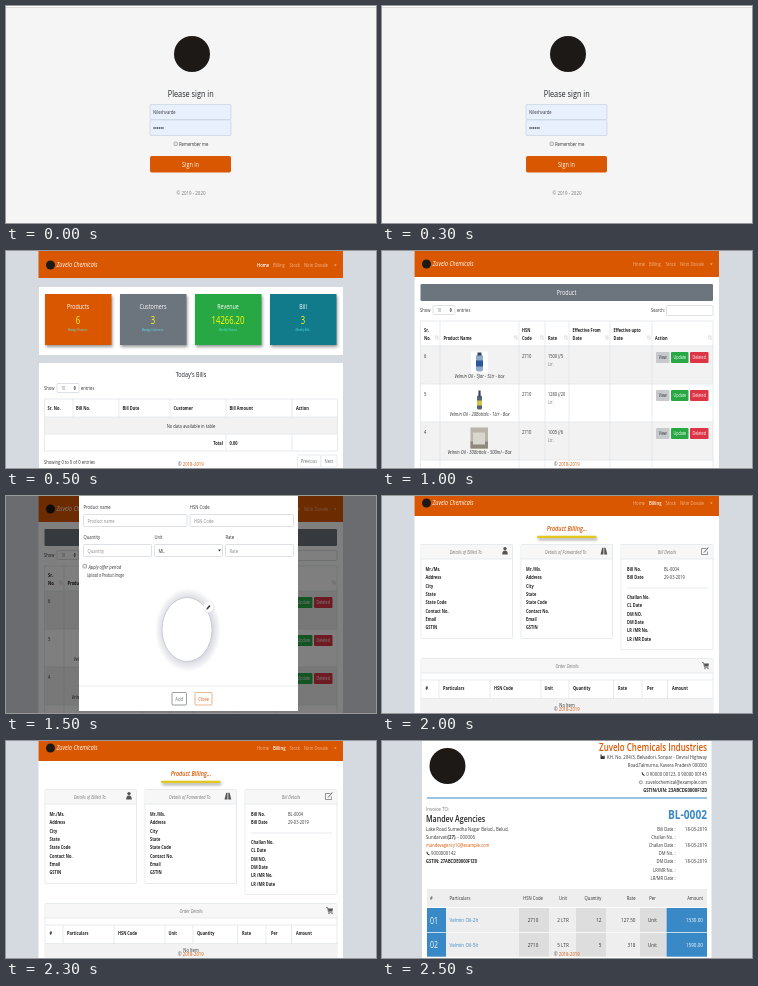
Write an HTML page that moves like this. It is 370 px wide and 217 px high and loops after 3000 ms.

```html
<!DOCTYPE html>
<html lang="en">
<head>
<meta charset="utf-8">
<title>Billing app tour</title>
<style>
  html, body { margin: 0; width: 100%; height: 100%; overflow: hidden; background: #d5dae1; }
  svg { display: block; width: 370px; height: 217px; }
  text { font-family: "Open Sans", "Noto Sans", sans-serif; white-space: pre; }
  .m { text-anchor: middle; }
  .e { text-anchor: end; }
  .b { font-weight: 700; }
  .h { font-weight: 600; }
  .i { font-style: italic; }
  .card { filter: drop-shadow(1.5px 2px 1.5px rgba(0, 0, 0, .4)); }
  .scene { visibility: hidden; animation: one 3s step-end infinite; }
  .scene.long { animation-name: two; }
  @keyframes one { 0% { visibility: visible; } 16.6667%, 100% { visibility: hidden; } }
  @keyframes two { 0% { visibility: visible; } 33.3333%, 100% { visibility: hidden; } }
</style>
</head>
<body>
<svg id="stage" viewBox="0 0 370 217" xmlns="http://www.w3.org/2000/svg"></svg>
<script>
const ORANGE = '#d95700', GREY = '#6c757d', GREEN = '#28a745', BLUE = '#3989c6';
const INK = '#333', DIM = '#777', LINE = '#dee2e6', PAGE = '#d5dae1', DARK = '#1d1917';
const SQUEEZE = .77; // the screens are shown narrower than their natural width

const each = (list, fn) => list.map(fn).join('');
const text = (x, y, str, size = 5.4, fill = INK, cls = '') =>
  `<text transform="translate(${x} ${y}) scale(${SQUEEZE} 1)" font-size="${size}" fill="${fill}" class="${cls}">${str}</text>`;
const box = (x, y, x2, y2, fill, extra = '') =>
  `<rect x="${x}" y="${y}" width="${x2 - x}" height="${y2 - y}" fill="${fill}" ${extra}/>`;
const frame = (x, y, x2, y2, stroke = LINE, fill = '#fff', r = 1) =>
  box(x + .5, y + .5, x2 - .5, y2 - .5, fill, `stroke="${stroke}" stroke-width=".7" rx="${r}"`);
const path = (d, stroke = LINE, width = .7, fill = 'none') =>
  `<path d="${d}" stroke="${stroke}" stroke-width="${width}" fill="${fill}"/>`;
const solid = (d, fill) => path(d, 'none', 0, fill);
const dot = (x, y, r, fill = DARK) => `<circle cx="${x}" cy="${y}" r="${r}" fill="${fill}"/>`;
const phone = (x, y) => path(`M${x} ${y}q.2 2.5 2.6 3.2`, INK, 1.1);
const vlines = (xs, y, y2) => path(each(xs, x => `M${x} ${y}V${y2}`));
const hlines = (ys, x, x2) => path(each(ys, y => `M${x} ${y}H${x2}`));
const scene = (slot, body, long = '') =>
  `<g class="scene ${long}" style="animation-delay:${slot * 500 - 3000}ms">${body}</g>`;

const backdrop = box(0, 0, 370, 217, PAGE);
const copyright = text(172, 215, `© <tspan fill="${ORANGE}">2018-2019</tspan>`, 5.6);

function nav(bottom, active) {
  const y = bottom - 11;
  const links = [['Home', 251], ['Billing', 267], ['Stock', 283.5], ['Nitin Dovale', 298]];
  return box(32.5, 0, 337, bottom, ORANGE) + dot(44.5, y - 2, 4.5) +
    text(50.5, y, 'Zuvelo Chemicals', 7, '#fff', 'i') +
    each(links, ([s, x]) => s === active ? text(x, y, s, 5.5, '#fff', 'h') : text(x, y, s, 5.5, '#f3b48c')) +
    solid(`M328 ${y - 2.5}h2.6l-1.3 1.5z`, '#f3b48c');
}

function lengthMenu(y) {
  return text(38, y, 'Show') + frame(50.5, y - 7, 73.5, y + 3, '#ced4da') +
    text(55, y - .2, '10', 4.8, DIM) +
    solid(`M67.5 ${y - 2.5}l1.3 -1.6l1.3 1.6zM67.5 ${y - 1.5}l1.3 1.6l1.3 -1.6z`, INK) +
    text(75, y, 'entries');
}

function login() {
  return box(0, 0, 370, 217, '#f5f5f5') + box(0, 0, 370, 1, '#fff') + box(0, 1, 370, 2, '#dcdcdc') +
    dot(186, 48, 18) +
    text(184.7, 91, 'Please sign in', 9.5, '#212529', 'm') +
    frame(143.5, 98, 225.5, 114, '#c9d3e4', '#e8f0fe') +
    frame(143.5, 113.5, 225.5, 130, '#c9d3e4', '#e8f0fe') +
    text(147, 108, 'Nileshvarde', 5.3) +
    each([0, 1, 2, 3, 4, 5], i => dot(148 + i * 1.8, 122, .75, '#222')) +
    frame(167.5, 135.5, 172, 140, '#aaa', '#ddd', .5) +
    text(173, 140, 'Remember me', 5.5) +
    box(144, 150, 225, 166.5, ORANGE, 'rx="1.8"') +
    text(184.5, 161, 'Sign in', 7.1, '#fff', 'm') +
    text(185, 189, '© 2019 - 2020', 5.8, DIM, 'm');
}

function dashboard() {
  const cards = [
    [39, ORANGE, 'Products', '6', 'Manage Products..'],
    [114, GREY, 'Customers', '3', 'Manage Customers..'],
    [189, GREEN, 'Revenue', '14266.20', 'Monthly Revenue'],
    [264, '#117a8b', 'Bill', '3', 'Monthly Bills..'],
  ];
  const heads = [['Sr. No.', 41.5], ['Bill No.', 70], ['Bill Date', 116.5], ['Customer', 167.5], ['Bill Amount', 223.5], ['Action', 290]];
  return backdrop + nav(27, 'Home') + box(33, 36, 337, 104, '#fff') + box(33, 112, 337, 217, '#fff') +
    each(cards, ([x, fill, name, count, note]) =>
      box(x, 43, x + 66.5, 94, fill, 'class="card"') +
      text(x + 33, 58, name, 7, '#fff', 'm') +
      text(x + 33, 73, count, 10, '#ff0', 'm') +
      text(x + 33, 80, note, 3.2, '#5ee6ee', 'm i')) +
    text(185, 126, "Today's Bills", 7.1, '#212529', 'm') +
    lengthMenu(139) +
    box(39, 166, 331.5, 183, '#f2f2f2') +
    hlines([148, 166, 183, 200], 38.5, 331.5) +
    vlines([38.5, 331.5], 148, 200) + vlines([67, 113, 164, 220, 286], 148, 166) +
    vlines([220, 286], 183, 200) +
    each(heads, ([s, x]) => text(x, 158.5, s, 5.2, '#222', 'b')) +
    text(185, 176.5, 'No data available in table', 5.4, INK, 'm') +
    text(217, 193.5, 'Total', 5.2, '#222', 'b e') + text(223.5, 193.5, '0.00', 5.2, '#222', 'b') +
    text(38, 213, 'Showing 0 to 0 of 0 entries', 5.4) +
    frame(291, 203.5, 315.5, 216.5) + frame(314.5, 203.5, 331.5, 216.5) +
    text(303, 212, 'Previous', 5.4, GREY, 'm') + text(323, 212, 'Next', 5.4, GREY, 'm') +
    copyright;
}

// Small flat stand-ins for the product pictures
const pictures = [
  y => box(89, y, 106, y + 21, '#fff') + box(94, y + 3, 101, y + 20, '#8eaacb', 'rx="2"') +
    box(94, y + 9, 101, y + 15, '#2d5797') + box(95.5, y + 1, 99.5, y + 4, '#34475f'),
  y => box(89, y, 106, y + 21, '#fff') + box(95, y + 6, 100, y + 20, '#51627a', 'rx="1.5"') +
    box(95, y + 11, 100, y + 16, '#d6c14b') + box(96.4, y + 1, 98.6, y + 7, '#3a4658'),
  y => box(88.5, y, 106, y + 21, '#b9b3a8') + box(88.5, y + 14, 106, y + 21, '#8f887d') +
    box(91, y + 5, 103, y + 17, '#d9d6cf'),
];

function products() {
  const heads = [
    ['Sr.', 'No.', 42, 54], ['', 'Product Name', 61.5, 133], ['HSN', 'Code', 140, 159], ['', 'Rate', 166, 183],
    ['Effective From', 'Date', 190.5, 224], ['Effective upto', 'Date', 231.5, 266], ['', 'Action', 273, 327],
  ];
  const rows = [
    [6, 'Velmin Oil - 5Jar - 5Ltr - box', '1500 (/5'],
    [5, 'Velmin Oil - 20Bottals - 1Ltr - Box', '1280 (/20'],
    [4, 'Velmin Oil - 30Bottals - 500ml - Box', '1005 (/6'],
  ];
  const actions = [['View', 274, 287.5, '#c6cacd', INK], ['Update', 289, 306.5, GREEN, '#fff'], ['Deleted', 308, 326.5, '#dc3545', '#fff']];
  const row = ([n, name, rate], k) => {
    const y = 95 + 38 * k;
    return (k % 2 ? '' : box(38.5, y, 331, y + 38, '#f2f2f2')) +
      text(42, y + 11.5, n) + pictures[k](y + 5.5) +
      text(97.5, y + 32, name, 5.4, INK, 'm i') +
      text(140, y + 11.5, '2710') + text(166, y + 11.5, rate, 5.2) + text(166, y + 19.5, 'Ltr.', 4.8, DIM) +
      each(actions, ([s, x, x2, fill, ink]) => box(x, y + 6, x2, y + 17, fill, 'rx="1"') +
        text((x + x2) / 2, y + 13.3, s, 4.8, ink, 'm'));
  };
  return backdrop + box(32.5, 0, 337, 217, '#fff') + nav(26) +
    box(38.5, 33, 331, 50, GREY, 'rx="1.2"') + text(184.5, 44, 'Product', 7, '#fff', 'm') +
    lengthMenu(61) + text(283, 61, 'Search:', 5.4, INK, 'e') + frame(284, 54, 331.5, 65, '#ced4da') +
    each(heads, ([a, b, x, arrow]) => text(x, 80.5, a, 5.1, '#222', 'b') + text(x, 88.5, b, 5.1, '#222', 'b') +
      path(`M${arrow} 88.5v-4l-.8 1M${arrow + 1.8} 84.5v4l.8 -1`, '#bbb', .5)) +
    each(rows, row) +
    hlines([70, 95, 133, 171, 209], 38.5, 331) +
    vlines([38.5, 58, 137, 163, 187, 228, 270, 331], 70, 217) + copyright;
}

function dialog() {
  const field = (x, x2, y, label, hint = label, ink = '#888') =>
    text(x, y, label) + frame(x - .5, y + 5.5, x2, y + 18.5, '#ced4da') + text(x + 4, y + 14, hint, 5.4, ink);
  return box(0, 0, 370, 217, '#000', 'opacity=".5"') + box(73, 0, 292, 215, '#fff') +
    field(77.5, 181.5, 12.5, 'Product name') + field(184, 288, 12.5, 'HSN Code') +
    field(77.5, 146, 42.5, 'Quantity') + field(148.5, 217, 42.5, 'Unit', 'ML', INK) + field(219.5, 288, 42.5, 'Rate') +
    solid('M212 53.5h3l-1.5 2z', INK) +
    frame(76.5, 68, 81, 72.5, '#888', '#eee', .5) + text(82.5, 72.5, 'Apply offer period', 5.4, INK, 'i') +
    text(81, 81, 'Upload a Product Image', 4.5, INK, 'i') +
    '<ellipse cx="182" cy="134" rx="33" ry="42" fill="url(#halo)"/>' +
    '<ellipse cx="181" cy="133.5" rx="25" ry="32" fill="#fff" stroke="#c3c8d6" stroke-width=".9"/>' +
    dot(203, 111.5, 5.6, '#e4e4e8') + dot(202.5, 111, 5, '#fff') +
    path('M201 113l3 -3.5', INK, 1.5) + path('M200.4 113.7l.6 -.7', INK, .6) +
    hlines([190], 73, 292) +
    frame(165.5, 196, 181, 209.5, GREY) + text(173.2, 205, 'Add', 5.5, GREY, 'm') +
    frame(188.5, 196, 206.5, 209.5, '#dc9a5c') + text(197.5, 205, 'Close', 5.5, ORANGE, 'm');
}

function billing() {
  const person = ['Mr./Ms.', 'Address', 'City', 'State', 'State Code', 'Contact No.', 'Email', 'GSTIN'];
  const bill = ['Challan No.', 'CL Date', 'DM NO.', 'DM Date', 'LR /MR No.', 'LR /MR Date'];
  const heads = [['#', 43.5], ['Particulars', 61], ['HSN Code', 112], ['Unit', 162.5], ['Quantity', 191], ['Rate', 236], ['Per', 265], ['Amount', 290]];
  const card = (x, x2, y, y2, title) => frame(x, y, x2, y2) +
    box(x + 1, y + 1, x2 - 1, y + 15, '#f7f7f7') + hlines([y + 15], x, x2) +
    text((x + x2) / 2 - (x2 < 300 ? 1 : 0), y + 9.5, title, 5.2, DIM, 'm i');
  const column = (list, x, y) => each(list, (s, k) => text(x, y + 8.35 * k, s, 5.1, '#222', 'b'));
  const icon = '#555';
  const icons =
    dot(123, 52.6, 1.7, icon) + solid('M120.2 58.6q0 -4 2.8 -4t2.8 4z', icon) +
    solid('M220.2 51.8h1.3v6.8h-3zM222.3 51.8h1.3l1.7 6.8h-3z', icon) +
    path('M324.5 52.5h-5v6h6v-3', icon, .6) + path('M322 56.5l4.4 -5', icon, .9) +
    path('M320 166.5h1.5l1 4.8h4', icon, .7) + solid('M322 167.5h5l-.7 3h-3.8z', icon) +
    dot(323, 172.6, .7, icon) + dot(326, 172.6, .7, icon);
  return backdrop + box(32.5, 0, 337, 217, '#fff') + nav(20, 'Billing') +
    text(185, 35, 'Product Billing...', 7.1, ORANGE, 'm h i') +
    box(155, 39.7, 214.5, 42, '#e2c81c', 'rx="1" class="card"') +
    card(38.5, 131, 48, 143, 'Details of Billed To') +
    card(138.5, 231, 48, 143, 'Details of Forwarded To') +
    card(238.5, 331.5, 48, 154, 'Bill Details') +
    card(38.5, 331.5, 162, 230, 'Order Details') + icons +
    column(person, 43.5, 75) + column(person, 144, 75) +
    column(['Bill No.', 'Bill Date'], 245, 75) + text(282, 75, 'BL-0004', 5.2) + text(282, 83.3, '29-03-2019', 5.2) +
    hlines([92], 245, 326) + column(bill, 245, 103) +
    box(39.5, 203, 330.5, 217, '#f2f2f2') +
    hlines([184, 202.5], 39, 331) + vlines([57, 108, 159, 187, 231.5, 260, 285.5], 184, 203) +
    each(heads, ([s, x]) => text(x, 193.5, s, 5.1, '#222', 'b')) +
    text(185, 211, 'No Item', 5.4, INK, 'm') + copyright;
}

function invoice() {
  const right = [
    ['KH. No. 204/3, Belvadori, Sonpar - Devral Highway', 18], ['Road,Talmurna, Kavera Pradesh 000000', 26.3],
    ['0 90000 00123, 0 90000 00145', 34.8], ['zuvelochemical@example.com', 43],
  ];
  const dates = ['Bill Date :', 'Challan No. :', 'Challan Date :', 'DM No. :', 'DM Date :', 'LR/MR No. :', 'LR/MR Date :'];
  // name, text x, anchor, cell edges
  const cols = [
    ['#', 48, '', 45, 64], ['Particulars', 67.5, '', 64, 137], ['HSN Code', 151, 'm', 137, 167], ['Unit', 181, 'm', 167, 194],
    ['Quantity', 219.5, 'e', 194, 224], ['Rate', 253.5, 'e', 224, 258], ['Per', 270.5, 'm', 258, 284], ['Amount', 321, 'e', 284.5, 325],
  ];
  const rows = [
    ['01', 'Velmin Oil-2lt', '2710', '2 LTR', '12', '127.50', 'Unit', '1530.00'],
    ['02', 'Velmin Oil-5lt', '2710', '5 LTR', '5', '318', 'Unit', '1590.00'],
  ];
  const cell = (s, k, y) => {
    const [, x, anchor, left, edge] = cols[k], strong = k === 0 || k === 7;
    return box(left, y, edge, y + 24, strong ? BLUE : k % 2 ? '#eee' : '#ddd') +
      text(x, y + (k ? 14.2 : 15.5), s, k ? 6 : 9, strong ? '#fff' : k === 1 ? BLUE : INK, anchor);
  };
  return backdrop + box(40, 0, 329.5, 217, '#fff') + dot(65.5, 25, 18) +
    text(325, 9.5, 'Zuvelo Chemicals Industries', 10.4, ORANGE, 'h e') +
    each(right, ([s, y]) => text(325, y, s, 5.6, INK, 'e')) +
    solid('M218.5 18v-4.5h1.2v2l1.5 -1v1l1.5 -1v3.5z', INK) + phone(260, 31.3) +
    '<circle cx="258.8" cy="41.3" r="1.5" fill="none" stroke="#555" stroke-width=".6"/>' +
    text(325, 51, 'GSTIN/UIN: 23ABCDE0000F1Z0', 5.6, '#222', 'b e') +
    box(45, 56.5, 325, 57.5, BLUE) +
    text(44, 70, 'Invoice TO:', 5.9, DIM) + text(44, 81, 'Mandev Agencies', 9.2, '#222', 'h') +
    text(44, 89.7, 'Lake Road Sumedha Nagar Belud., Belud,', 5.6) +
    text(44, 98, 'Sundarvati<tspan class="b">(27)</tspan>, - 000006', 5.6) +
    text(44, 106, 'mandevagency10@example.com', 5.4, ORANGE) +
    phone(44.8, 110.8) + text(49, 114, '9000000142', 5.6) +
    text(44, 122, 'GSTIN: 27ABCDE0000F1Z0', 5.3, '#222', 'b') +
    text(325, 77.5, 'BL-0002', 13.2, BLUE, 'b e') +
    each(dates, (s, k) => text(293.5, 89.5 + 8.2 * k, s, 5.4, INK, 'e') +
      (k % 2 || k > 4 ? '' : text(325, 89.5 + 8.2 * k, '18-03-2019', 5.5, INK, 'e'))) +
    box(45, 148, 325, 166, '#eee') +
    each(cols, ([s, x, anchor]) => text(x, 159, s, 5.5, INK, anchor)) +
    each(rows, (row, r) => each(row, (s, k) => cell(s, k, 167 + 24.7 * r))) + copyright;
}

document.getElementById('stage').innerHTML =
  `<defs><radialGradient id="halo">
    <stop offset=".72" stop-color="#d6d7de"/><stop offset="1" stop-color="#d6d7de" stop-opacity="0"/>
  </radialGradient></defs>` +
  scene(0, login()) + scene(1, dashboard()) + scene(2, products(), 'long') +
  scene(3, dialog()) + scene(4, billing()) + scene(5, invoice());
</script>
</body>
</html>
```
